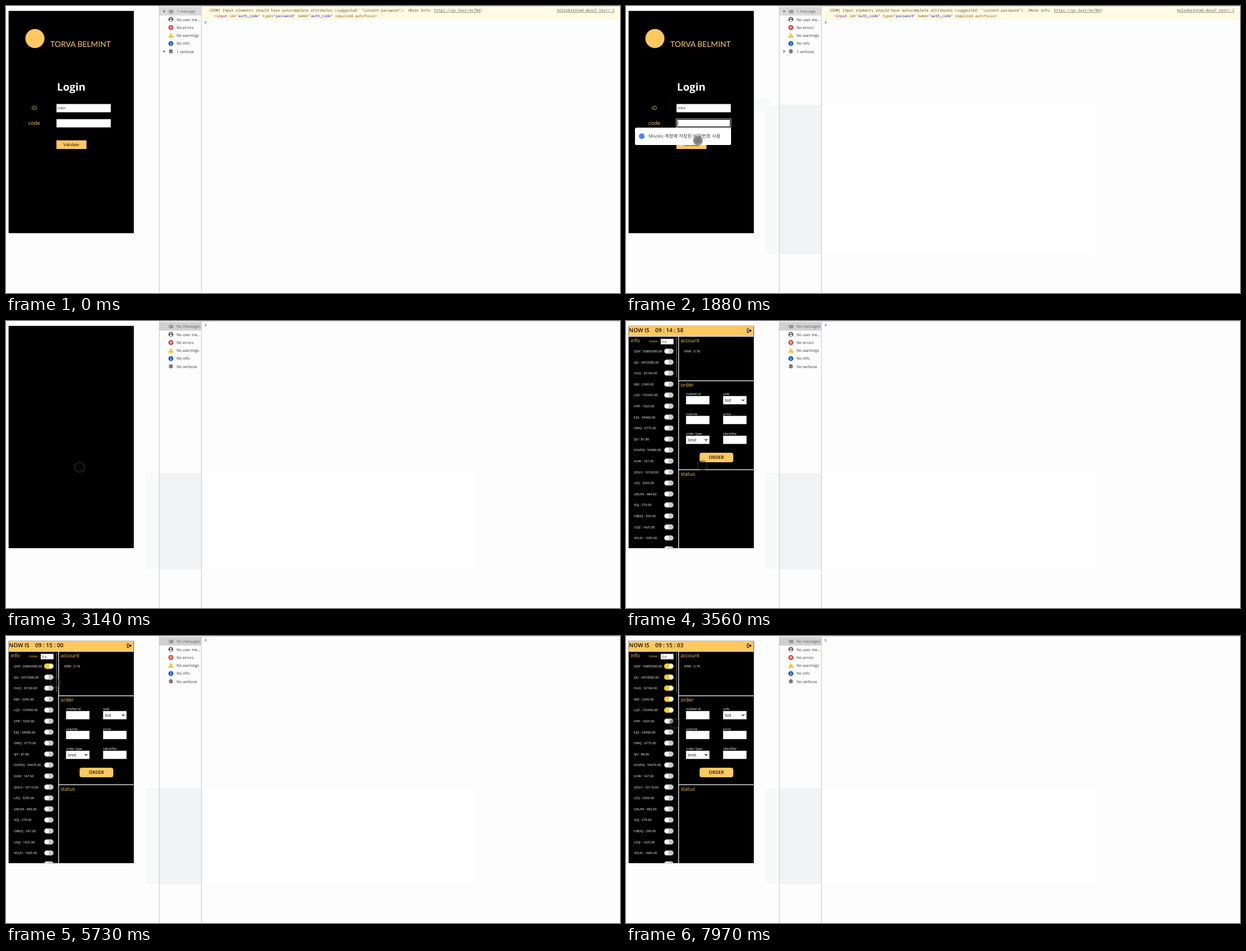
An HTML page with a canvas that plays this animation: 1093x512 px, repeating every 8000 ms.

```html
<!DOCTYPE html>
<html lang="ko">
<head>
<meta charset="utf-8">
<title>Login and order panel</title>
<style>
html, body { margin: 0; width: 100%; height: 100%; overflow: hidden; background: #fdfdfd; }
canvas { display: block; }
</style>
</head>
<body>
<canvas id="stage" width="1093" height="512"></canvas>
<script>
const ctx = document.getElementById('stage').getContext('2d');
const LOOP = 8000, GOLD = '#ffc861', PAGE = '#fdfdfd';
const SANS = '"Open Sans", "Noto Sans", sans-serif';
const MONO = '"Noto Sans Mono", "Liberation Mono", monospace';
const KOREAN = '"Open Sans", "Noto Sans CJK KR", "Noto Sans CJK", sans-serif';

const FOCUS = 1140, FILLED = 1950, BLUR = 2710, NAV = 3140, READY = 3240;

// [time, x, y]
const PATH = [
  [310, 258, 185], [420, 242, 176], [940, 125, 214], [1040, 125, 219],
  [1560, 125, 219], [1770, 128, 240], [1980, 128, 240], [2300, 131, 255],
  [2500, 131, 261], [3140, 131, 261], [3560, 136, 258], [3870, 114, 160],
  [4300, 88, 64], [5250, 87, 64], [5520, 88, 83], [6360, 88, 83],
  [6700, 88, 102], [7170, 88, 102], [7300, 87, 122], [7520, 87, 122],
  [7660, 87, 141], [7800, 87, 141], [7960, 87, 156]
];
const PRESSES = [FOCUS, 1840, BLUR, 5000, 5900, 6800, 7350, 7640];

// name, price, then later [time, price] updates
const COINS = [
  ['QDV', 56892000], ['ZJU', 4072000, [5900, 4074000]], ['HUQ', 32160],
  ['MJV', 2345], ['LQZ', 155450], ['VHP', 1025], ['EJQ', 59460, [4200, 59490]],
  ['OWQ', 6775], ['SJV', 87.8, [5950, 87.9], [7500, 88]],
  ['DOVEQ', 59480, [4300, 59470], [6450, 59510], [7300, 59470]],
  ['VUW', 147], ['QOLV', 10100, [4400, 10110]], ['LZQ', 3295, [7000, 3300]],
  ['GRUVE', 484, [4250, 483]], ['VQJ', 279],
  ['OBDQ', 292, [4500, 291], [7700, 290]], ['UQZ', 1425], ['VOLKI', 1605], ['GZV', 272]
];
const SWITCHED = PRESSES.slice(3);

const clamp = v => Math.max(0, Math.min(1, v));

function rect(x, y, w, h, fill) {
  ctx.fillStyle = fill;
  ctx.fillRect(x, y, w, h);
}
function round(x, y, w, h, r, fill) {
  ctx.fillStyle = fill;
  ctx.beginPath();
  ctx.roundRect(x, y, w, h, r);
  ctx.fill();
}
function disc(x, y, r, fill) {
  ctx.fillStyle = fill;
  ctx.beginPath();
  ctx.arc(x, y, r, 0, Math.PI * 2);
  ctx.fill();
}
function line(points, color, width = 1) {
  ctx.strokeStyle = color;
  ctx.lineWidth = width;
  ctx.beginPath();
  points.forEach(([x, y]) => ctx.lineTo(x, y));
  ctx.stroke();
}
function poly(points, fill) {
  ctx.fillStyle = fill;
  ctx.beginPath();
  points.forEach(([x, y]) => ctx.lineTo(x, y));
  ctx.fill();
}
function text(str, x, y, size, color, { weight = 400, family = SANS, align = 'left' } = {}) {
  ctx.font = `${weight} ${size}px ${family}`;
  ctx.textAlign = align;
  ctx.fillStyle = color;
  ctx.fillText(str, x, y);
}
function mono(parts, x, y) {
  for (const [str, color, underline] of parts) {
    text(str, x, y, 6.54, color, { family: MONO });
    const w = ctx.measureText(str).width;
    if (underline) rect(x, y + 1, w, 0.6, color);
    x += w;
  }
}

function sidebarIcons() {
  const x = 293.5, dark = '#5a5d61';
  for (const y of [7.5, 9.5, 11.5]) {
    rect(289.5, y, 1, 1, dark);
    rect(291.3, y, 6.5, 1, dark);
  }
  disc(x, 24, 4.4, dark);
  disc(x, 22.6, 1.4, '#fff');
  ctx.beginPath();
  ctx.ellipse(x, 26.3, 2.6, 1.2, 0, 0, Math.PI * 2);
  ctx.fill();
  disc(x, 38.3, 4.4, '#e0352f');
  line([[x - 1.8, 36.5], [x + 1.8, 40.1]], '#fff', 1.1);
  line([[x + 1.8, 36.5], [x - 1.8, 40.1]], '#fff', 1.1);
  poly([[x, 48], [x + 4.8, 56.6], [x - 4.8, 56.6]], '#f2b90f');
  rect(x - 0.5, 51, 1, 2.8, '#fff');
  rect(x - 0.5, 54.5, 1, 1, '#fff');
  disc(x, 67, 4.4, '#1d57d0');
  rect(x - 0.6, 64.3, 1.2, 1.2, '#fff');
  rect(x - 0.6, 66.3, 1.2, 3.2, '#fff');
  round(x - 2.4, 77.5, 4.8, 7, 2.2, dark);
  for (const y of [78.8, 80.7, 82.6]) rect(x - 3.8, y, 7.6, 0.9, dark);
  line([[x - 2.3, 76.7], [x - 1, 78.2]], dark, 0.8);
  line([[x + 2.3, 76.7], [x + 1, 78.2]], dark, 0.8);
  rect(x - 1, 79.8, 2, 0.7, '#fff');
  rect(x - 1, 81.8, 2, 0.7, '#fff');
}

function devtools(t) {
  const loggedIn = t >= NAV;
  if (t >= 310) {
    const top = loggedIn ? 271 : 176, h = 443 - top;
    if (!loggedIn) rect(228, 165, 28, 23, '#f8f9f9');
    rect(249, top, 24, h, '#f8f9f9');
    rect(273, top, 75, h, '#f1f3f5');
    rect(348, top, 486, h, '#fefefe');
  }
  rect(273, 2, 75, 15, loggedIn ? '#d0d0d0' : '#dadada');
  for (const x of [272.4, 347.4]) rect(x, 0, 1, 512, '#c6c6c6');
  rect(273, 0, 820, 1, '#cfcfcf');
  sidebarIcons();
  const labels = [loggedIn ? 'No messages' : '1 message', 'No user me...', 'No errors',
    'No warnings', 'No info', loggedIn ? 'No verbose' : '1 verbose'];
  labels.forEach((s, i) => text(s, 303.7, 12.4 + i * 14.27, 6.8, i ? '#303235' : '#5f6266'));

  const py = loggedIn ? 7.3 : 29.5;
  line([[354, py - 2.2], [356.4, py], [354, py + 2.2]], '#3b7be0', 1.1);
  if (loggedIn) return;

  for (const y of [9.5, 81]) poly([[280.3, y - 2.5], [284, y], [280.3, y + 2.5]], '#6e6e6e');
  rect(348.4, 1, 745, 22, '#fffbe5');
  rect(348.4, 22.7, 745, 0.8, '#fff3c4');
  const brown = '#6b4d12', tag = '#8a1c83', attr = '#9a4a0c', val = '#2323a8';
  mono([['[DOM] Input elements should have autocomplete attributes (suggested: "current-password"): (More info: ', brown],
    ['https://qv.test/4x7Rd', '#55554f', true], [')', brown]], 362, 10.4);
  const tokens = [['<input ', tag]];
  for (const [k, v] of [['id', 'auth_code'], ['type', 'password'], ['name', 'auth_code']])
    tokens.push([k, attr], ['="', tag], [v, val], ['" ', tag]);
  tokens.push(['required autofocus', attr], ['>', tag]);
  mono(tokens, 370.5, 19.5);
  mono([['milorbrinted.dovu7.test/:1', '#55554f', true]], 981, 10.4);
}

function field(x, y, w, h = 14) {
  rect(x - 0.3, y - 0.3, w + 1, h + 1, '#a8a8a8');
  rect(x + 0.2, y + 0.2, w, h, '#fff');
}

function login(t) {
  disc(51.5, 58, 17, GOLD);
  text('TORVA BELMINT', 79, 72.6, 13.8, GOLD, { family: 'Lato, sans-serif' });
  text('Login', 116.2, 151, 18.7, '#fff', { weight: 700, align: 'center' });
  text('ID', 50.3, 184.7, 9.4, GOLD, { align: 'center' });
  text('code', 50.3, 211.5, 9.4, GOLD, { align: 'center' });
  field(90, 175, 96);
  text('milor', 92, 184.3, 5.8, '#15151f');
  const focused = t >= FOCUS && t < BLUR;
  if (focused) {
    round(88.8, 200.8, 98.4, 16.4, 1.5, '#fff');
    round(89.6, 201.6, 96.8, 14.8, 1, '#000');
    rect(91, 203, 94, 12, '#fff');
  } else {
    field(90, 202, 96);
  }
  if (t >= FILLED) {
    for (let i = 0; i < 24; i++) disc(93 + i * 2.12, 209, 0.8, '#222');
  } else if (focused) {
    rect(92, 205, 0.8, 8, '#222');
  }
  rect(89.7, 239.7, 53.6, 15.4, GOLD);
  text('Validate', 116.3, 250.1, 7.5, '#111', { align: 'center' });
  if (focused && t < FILLED) {
    round(16, 217, 171, 31, 2.5, '#fff');
    disc(28, 232.3, 5, '#4285f4');
    text('Mivolo 계정에 저장된 비밀번호 사용', 40, 235.3, 8.45, '#3c4043', { family: KOREAN });
  }
}

function toggle(y, on) {
  round(68, y - 4.6, 16.6, 9.2, 4.6, '#c8c8c8');
  ctx.globalAlpha = on;
  round(68, y - 4.6, 16.6, 9.2, 4.6, '#f5cb2b');
  ctx.globalAlpha = 1;
  disc(72.5 + 7.6 * on, y, 3.6, '#fff');
}

function select(x, y, label) {
  field(x, y, 41);
  text(label, x + 3, y + 9.8, 7.5, '#111');
  line([[x + 33.3, y + 5.8], [x + 35.5, y + 8.2], [x + 37.7, y + 5.8]], '#111', 1.2);
}

function header(t) {
  rect(5, 9, 222, 18, GOLD);
  const sec = Math.max(58, 58 + Math.floor((t - 2920) / 1000));
  const pad = n => String(n).padStart(2, '0');
  const bold = { weight: 600 };
  text('NOW IS', 5.3, 19.8, 10, '#111', bold);
  text(`09 : ${pad(14 + Math.floor(sec / 60))} : ${pad(sec % 60)}`, 52, 19.8, 10, '#111', bold);
  line([[219, 14], [216, 14], [216, 20.4], [219, 20.4]], '#111', 1.1);
  rect(218, 16.3, 3, 1.9, '#111');
  poly([[220.5, 14.2], [223.7, 17.2], [220.5, 20.2]], '#111');
}

function coinList(t) {
  text('info', 8.2, 38, 9, GOLD);
  text('noise :', 40.5, 38.3, 6, GOLD);
  field(62, 32, 22, 9);
  text('0.6', 64, 38.8, 5.8, '#222');
  rect(89.2, 30, 1.6, 70, '#4c4c4c');
  COINS.forEach(([name, first, ...updates], i) => {
    const y = 53.8 + i * 19.6;
    const price = updates.reduce((p, [at, next]) => t >= at ? next : p, first);
    text(`${name} : ${price.toFixed(2)}`, 14, y + 2.1, 5.7, '#fff');
    toggle(y, i < SWITCHED.length ? clamp((t - SWITCHED[i] - 80) / 250) : 0);
  });
}

function orderForm() {
  text('account', 97.3, 38, 9, GOLD);
  text('KRW : 0.76', 103.7, 55.9, 5.7, '#fff');
  text('order', 97.3, 117, 9, GOLD);
  text('status', 97.3, 275.6, 9, GOLD);
  const labels = [['market id', 'side'], ['volume', 'price'], ['order type', 'identifier']];
  const options = { side: 'bid', 'order type': 'limit' };
  labels.forEach((pair, row) => pair.forEach((label, col) => {
    const x = 107 + col * 66, y = 134 + row * 35.4;
    text(label, x, y - 1.7, 5.8, '#fff');
    if (options[label]) select(x, y, options[label]);
    else field(x, y, 41);
  }));
  round(131, 235, 60, 17, 4, GOLD);
  text('ORDER', 161, 246, 8, '#111', { weight: 600, align: 'center' });
}

function dashboard(t) {
  header(t);
  coinList(t);
  orderForm();
  const pale = '#f2f2f2';
  rect(5, 27, 222, 1, pale);
  rect(93, 28, 1.3, 377, pale);
  rect(94, 106, 133, 1.3, pale);
  rect(94, 264.7, 133, 1.3, pale);
}

function cursor(t) {
  if (t < PATH[0][0]) return;
  let i = PATH.findIndex(p => p[0] > t);
  if (i < 0) i = PATH.length - 1;
  const [t0, x0, y0] = PATH[i - 1], [t1, x1, y1] = PATH[i];
  const k = clamp((t - t0) / (t1 - t0));
  const x = x0 + (x1 - x0) * k, y = y0 + (y1 - y0) * k;
  if (PRESSES.some(p => t >= p && t < p + 110 + (p === FOCUS ? 100 : 0))) {
    const g = ctx.createRadialGradient(x, y, 0, x, y, 9.5);
    g.addColorStop(0, 'rgba(105,105,105,.95)');
    g.addColorStop(0.75, 'rgba(120,120,120,.85)');
    g.addColorStop(1, 'rgba(130,130,130,.25)');
    disc(x, y, 9.5, g);
  } else {
    disc(x, y, 8.7, 'rgba(15,15,15,.4)');
    ctx.strokeStyle = 'rgba(100,100,100,.45)';
    ctx.lineWidth = 1.3;
    ctx.stroke();
  }
}

function draw(t) {
  ctx.textRendering = 'geometricPrecision';
  rect(0, 0, 1093, 512, PAGE);
  devtools(t);
  ctx.save();
  ctx.beginPath();
  ctx.rect(4.6, 8.8, 223, 396.5);
  ctx.clip();
  rect(4, 8, 225, 398, '#000');
  if (t < NAV) login(t);
  else if (t >= READY) dashboard(t);
  ctx.restore();
  cursor(t);
}

const start = performance.now();
function tick() {
  draw((performance.now() - start) % LOOP);
  requestAnimationFrame(tick);
}
tick();
</script>
</body>
</html>
```
